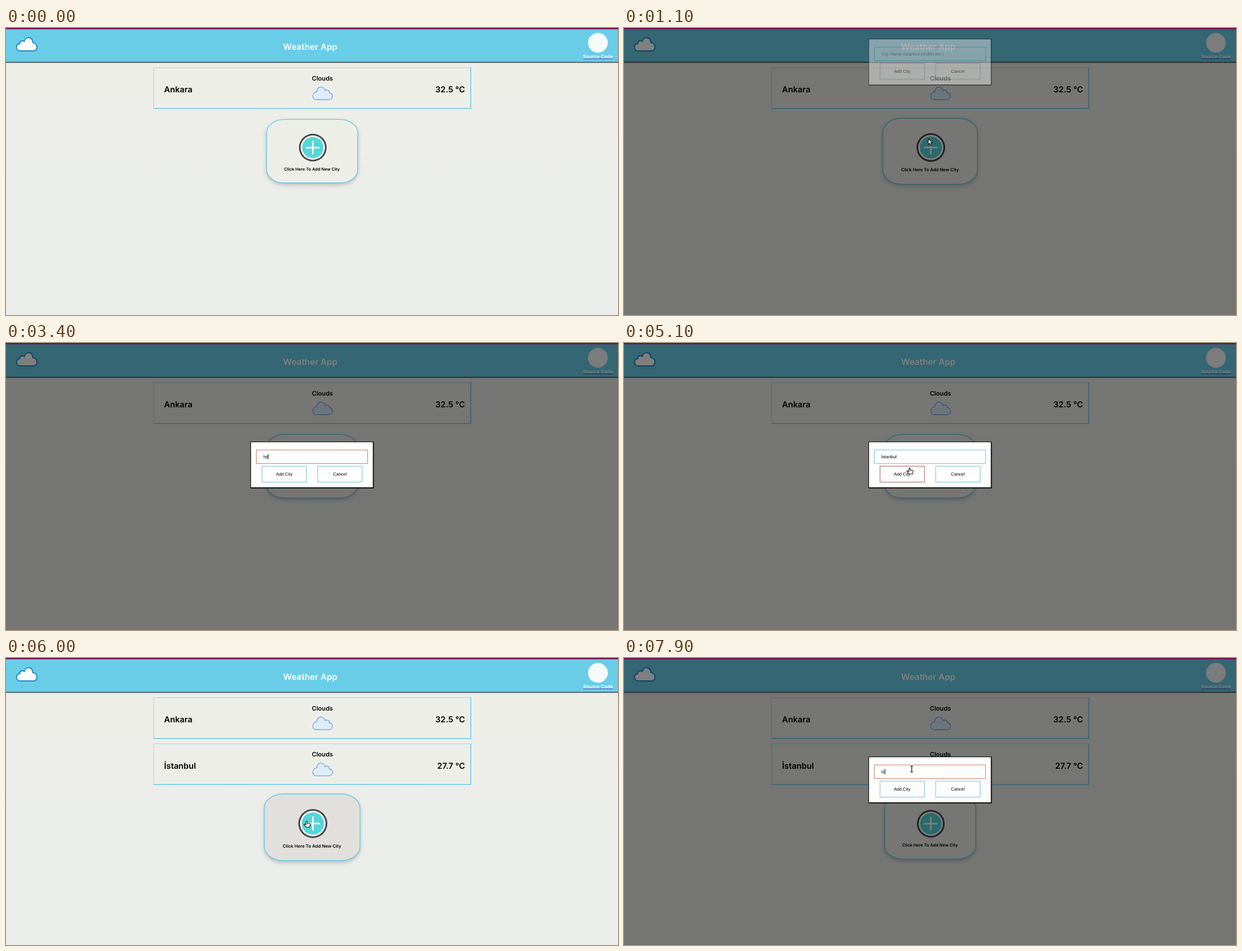
Write an HTML page that moves like this. It is 1092 by 513 pixels and loops after 8000 ms.

```html
<!DOCTYPE html>
<html lang="en">
<head>
<meta charset="utf-8">
<title>Weather App</title>
<style>
  html, body { margin: 0; width: 100%; height: 100%; overflow: hidden; background: #ebedea; }
  svg { display: block; width: 1092px; height: 513px; }
  text { font-family: Inter, Roboto, sans-serif; font-weight: 600; text-rendering: geometricPrecision; }
  .big { font-size: 14.7px; }
  .mid { text-anchor: middle; }
  .end { text-anchor: end; }
  .rowbox { fill: #eeeee9; stroke: #9bd8e8; }
  .rowedge { fill: none; stroke: #6fcce6; stroke-width: 1.6; }
  .rowcloud { fill: #dcecfa; stroke: #7fa3da; stroke-width: 1.5; }
  #panel { stroke: #63c9e6; stroke-width: 1.3; filter: drop-shadow(0 3.5px 3px rgba(0, 0, 0, .2)); }
  #modal text { font: 7.87px "Liberation Sans", Arial, sans-serif; }
  .field { fill: #fefefe; stroke: #86cbdf; stroke-width: 1.2; }
  #cursor path { fill: #fff; stroke: #111; stroke-width: 1.1; stroke-linejoin: round; }
  #cursor .beam { fill: none; stroke: #333; stroke-width: 1.5; }
</style>
</head>
<body>
<svg viewBox="0 0 1092 513">
  <defs>
    <linearGradient id="paper" x2="0" y2="1">
      <stop offset=".15" stop-color="#eeeee9"/>
      <stop offset=".6" stop-color="#ebedea"/>
    </linearGradient>
    <path id="cloud" d="M-11 11.5C-20.5 11.5-20.5-1.5-12.5-1.5C-13-6.5-7-8-4.5-5.5C-2-15 10-14.5 11-3.5C20-2.5 21 11.5 12 11.5Z"/>
  </defs>

  <rect width="1092" height="513" fill="url(#paper)"/>
  <rect y="2" width="1092" height="59" fill="#69cde8"/>
  <rect y="60.5" width="1092" height="1.8" fill="#48565d"/>
  <use href="#cloud" x="37" y="29.5" fill="#fff" stroke="#1b87c9" stroke-width="2"/>
  <text class="mid" x="543" y="39.3" font-size="15.3" fill="#fff">Weather App</text>
  <circle cx="1056.2" cy="26.5" r="17.7" fill="#f6fafb"/>
  <text class="mid" x="1056.5" y="53.6" font-size="8.6" fill="#fff">Source Code</text>
  <rect x="1030" y="54.6" width="53" height="1" fill="#4b45b5"/>

  <g id="rows"></g>

  <g id="card">
    <rect id="panel" x="465" y="163.4" width="162.5" height="113.6" rx="32.5" ry="24"/>
    <circle cx="547.4" cy="213.8" r="24.7" fill="#45454d"/>
    <circle cx="547.4" cy="213.8" r="21.7" fill="#fff"/>
    <circle cx="547.4" cy="213.8" r="19" fill="#55d6d9"/>
    <path d="M535.4 213.8h24M547.4 201.8v24" stroke="#fff" stroke-width="2.7"/>
    <text class="mid" x="546" y="254.7" font-size="7.5">Click Here To Add New City</text>
  </g>

  <rect id="shade" y="2" width="1092" height="511" opacity=".5"/>
  <rect width="1092" height="2.2" fill="#700f4e"/>

  <g id="modal">
    <rect x="436.6" y="176.7" width="218.6" height="82" fill="#fefefe" stroke="#000" stroke-width="1.1"/>
    <path d="M437 259h218.6v-82" fill="none" stroke="#000" stroke-width="1.4"/>
    <rect id="input" class="field" x="446.6" y="191.2" width="198.6" height="24.2"/>
    <text id="value" x="459" y="205.9"></text>
    <path id="caret" d="M0 198.7v9.2" stroke="#000" stroke-width="1"/>
    <rect id="add" class="field" x="456.8" y="220.2" width="79.4" height="28.4"/>
    <text class="mid" x="496.3" y="237.2">Add City</text>
    <rect class="field" x="556.1" y="220.2" width="79.4" height="28.4"/>
    <text class="mid" x="595.7" y="237.2">Cancel</text>
  </g>

  <g id="cursor">
    <path data-kind="arrow" d="M0 0V10.2L2.4 8L4.2 12L6 11.2L4.3 7.4H7.5Z"/>
    <path data-kind="hand" d="M-1.2.8Q0-.6 1.2.8V4H5Q6.5 4.3 6.3 6L5.5 10.5H-1L-5 6Q-4.8 4.6-3.4 5L-1.2 6.6Z"/>
    <path data-kind="beam" class="beam" d="M-2.3-5H2.3M0-5V5M-2.3 5H2.3"/>
  </g>
</svg>

<script>
const LOOP = 8000, TICK = 100, KEY_GAP = 170;
const ROW_STEP = 82.4, DROP = 263, ROW_ADDED = 5700;
const HINT = 'City Name (istanbul london etc.)';
const $ = id => document.getElementById(id);

// The two visits to the dialog, in ms.
const visits = [
  { open: 1000, focus: 1900, type: 3000, word: 'İstanbul', press: 5100, close: 5200 },
  { open: 6200, focus: 7100, type: 7600, word: 'İzmir', press: LOOP, close: LOOP }
];

// Pointer path: ms, x, y; straight moves in between.
const path = [
  [200, 585, 5], [700, 543, 198], [1300, 543, 198], [1600, 524.2, 210.5], [1900, 522.5, 208.5],
  [4700, 523, 209], [5100, 509.5, 223.5], [5500, 509.5, 223.5], [6000, 536.5, 291.7],
  [6300, 535.2, 292], [6600, 513.5, 224.5], [6900, 513.4, 198.5]
];

$('rows').innerHTML = [['Ankara', '32.5'], ['İstanbul', '27.7']].map(([city, temp], i) => `
  <g transform="translate(0 ${i * ROW_STEP})"><g class="row">
    <rect class="rowbox" x="263.3" y="71" width="566" height="72.8"/>
    <path class="rowedge" d="M263 143.8H829.3V70.6"/>
    <text class="big" x="282" y="115.2">${city}</text>
    <text class="mid" x="564.6" y="94" font-size="11.1">Clouds</text>
    <use href="#cloud" class="rowcloud" transform="translate(565 117.2) scale(-.96 .96)"/>
    <text class="big end" x="819" y="115.2">${temp} °C</text>
  </g></g>`).join('');
const rows = [...document.querySelectorAll('.row')];
const pointers = [...document.querySelectorAll('#cursor path')];

const part = (t, from, span) => Math.min(1, Math.max(0, (t - from) / span));
const slide = (t, from) => 1 - (1 - part(t, from, 440)) ** 2;
const swell = (t, from) => { const u = part(t, from, 300); return u * u * (3 - 2 * u); };
const within = (t, ...spans) => spans.some(([from, to]) => t >= from && t < to);
const show = (el, on) => el.setAttribute('visibility', on ? 'visible' : 'hidden');
const scaleAt = (x, y, s) => `translate(${x} ${y}) scale(${s}) translate(${-x} ${-y})`;

function pointerAt(t) {
  const next = path.findIndex(p => p[0] > t);
  if (next <= 0) return path.at(next).slice(1);
  const [t0, x0, y0] = path[next - 1], [t1, x1, y1] = path[next];
  const u = (t - t0) / (t1 - t0);
  return [x0 + (x1 - x0) * u, y0 + (y1 - y0) * u];
}

function pointerKind(t) {
  if (within(t, [0, 200], [2200, 4700])) return 'none';
  if (within(t, [1600, 5000], [6600, LOOP])) return 'beam';
  return within(t, [600, 1000], [5100, 5300], [5700, 6300]) ? 'hand' : 'arrow';
}

function drawPage(t, [first, second]) {
  const added = t >= ROW_ADDED;
  const grow = [swell(t, 300) - swell(t, 400), swell(t, 5600) - swell(t, 5700)];
  rows.forEach((row, i) => row.setAttribute('transform', scaleAt(546, 107.4, 1 + .02 * grow[i])));
  show(rows[1], added);

  const hover = swell(t, 400) - swell(t, first.open) + swell(t, first.close) - swell(t, second.open);
  $('card').setAttribute('transform',
    `translate(0 ${added ? ROW_STEP : 0}) ` + scaleAt(546, 220.2, 1 + .05 * hover));
  const hot = within(t, [600, first.open + 1], [first.close + 1, second.open + 1]);
  $('panel').setAttribute('fill', hot ? '#e2e0dd' : '#eeeee9');
}

function drawModal(t, { open, focus, type, word, press, close }) {
  const shown = slide(t, open) - slide(t, close);
  show($('shade'), t > open && t <= close);
  $('modal').setAttribute('opacity', shown);
  $('modal').setAttribute('transform', `translate(0 ${(shown - 1) * DROP})`);

  const focused = within(t, [focus, press]);
  $('input').style.stroke = focused ? '#d98c6c' : '';
  $('add').style.stroke = within(t, [press, close + 1]) ? '#bd746b' : '';

  const count = t < type ? 0 : Math.min(word.length, 1 + Math.floor((t - type) / KEY_GAP));
  const value = $('value');
  value.textContent = count ? word.slice(0, count) : HINT;
  value.setAttribute('fill', count ? '#000' : '#757575');

  const lastKey = count ? type + (count - 1) * KEY_GAP : focus;
  const caretX = 459.5 + (count ? value.getComputedTextLength() : 0);
  $('caret').setAttribute('transform', `translate(${caretX} 0)`);
  $('caret').setAttribute('opacity', focused && (t - lastKey) % 1000 < 520 ? 1 : 0);
}

function draw(t) {
  drawPage(t, visits);
  drawModal(t, visits[t < visits[1].open ? 0 : 1]);
  const kind = pointerKind(t);
  $('cursor').setAttribute('transform', `translate(${pointerAt(t)})`);
  pointers.forEach(p => show(p, p.dataset.kind === kind));
}

const start = performance.now();
function tick() {
  const t = (performance.now() - start) % LOOP;
  draw(Math.floor(t / TICK) * TICK);
  requestAnimationFrame(tick);
}
tick();
</script>
</body>
</html>
```
